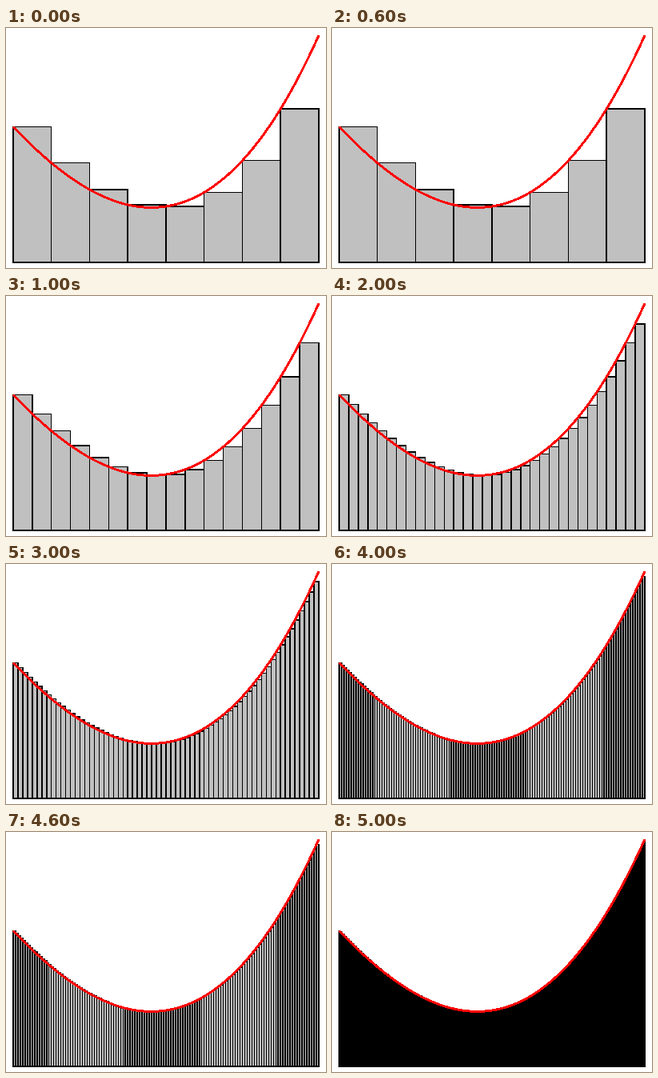
Animation, 400 px wide and 300 px high, one loop 6000 ms. Source, as a matplotlib script:

```python
import numpy as np
import matplotlib.pyplot as plt
from matplotlib.animation import FuncAnimation
from matplotlib.collections import PolyCollection
from matplotlib.path import Path

W, H, DPI = 400, 300, 100
LEFT, RIGHT, BASE = 8.98, 390.98, 293
EDGE, STROKE = 1.5, 3              # line widths in pixels
STEPS = 6


def height(s):
    """Cubic height in pixels for s running from 0 to 1."""
    u = 8 * s - 4
    return 70 + 7.34 * u + 9.794 * u**2 + 0.435 * u**3


def to_x(s):
    return LEFT + (RIGHT - LEFT) * s


def span(c):
    """Whole pixels whose centres lie under an edge line at c."""
    return np.ceil(c - EDGE / 2 - 0.5), np.floor(c + EDGE / 2 - 0.5) + 1


def box(x0, y0, x1, y1):
    x1, y1 = max(x0, x1), max(y0, y1)
    return [(x0, y0), (x1, y0), (x1, y1), (x0, y1)]


def bars(n):
    """Left Riemann sum: a black box and its gray inside for each part."""
    shapes = []
    bottom = span(BASE)
    for i in range(n):
        a, b = span(to_x(i / n)), span(to_x((i + 1) / n))
        top = span(BASE - height(i / n))
        shapes.append(box(a[0], top[0], b[1], bottom[1]))
        shapes.append(box(a[1], top[1], b[0], bottom[0]))
    return shapes


def curve_image():
    """Hard-edged stroke along the curve, without smoothing."""
    s = np.linspace(0, 1, 101)
    x, y = to_x(s), BASE - height(s)
    dx, dy = np.gradient(x), np.gradient(y)
    off = STROKE / 2 / np.hypot(dx, dy)
    nx, ny = -dy * off, dx * off
    outline = np.vstack([np.c_[x + nx, y + ny],
                         np.c_[x - nx, y - ny][::-1]])
    gx, gy = np.meshgrid(np.arange(W) + 0.5, np.arange(H) + 0.5)
    inside = Path(outline).contains_points(np.c_[gx.ravel(), gy.ravel()])
    image = np.zeros((H, W, 4))
    image[inside.reshape(H, W)] = (1, 0, 0, 1)
    return image


fig = plt.figure(figsize=(W / DPI, H / DPI), dpi=DPI, facecolor="white")
ax = fig.add_axes([0, 0, 1, 1])
ax.axis("off")

rects = PolyCollection(bars(8), facecolors=["black", "#c0c0c0"],
                       edgecolors="none", linewidths=0, zorder=1)
ax.add_collection(rects, autolim=False)
ax.imshow(curve_image(), extent=(0, W, H, 0), interpolation="nearest",
          aspect="auto", zorder=2)
ax.set_xlim(0, W)
ax.set_ylim(H, 0)


def draw(i):
    rects.set_verts(bars(8 * 2**i))
    return [rects]


anim = FuncAnimation(fig, draw, frames=STEPS, interval=1000,
                     init_func=lambda: draw(0), repeat=True, repeat_delay=0)
plt.show()
```
